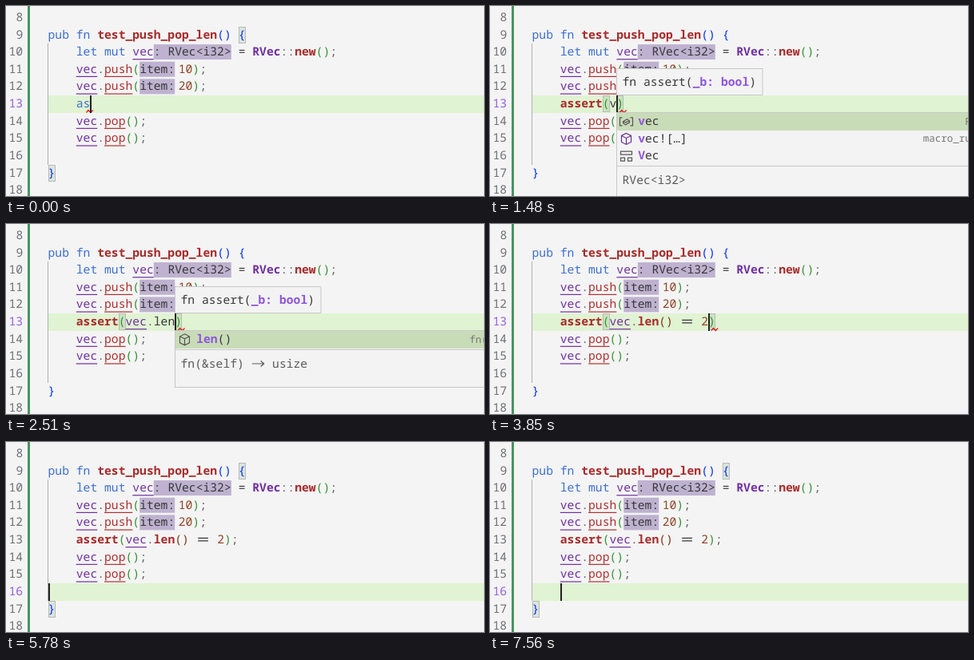
Recreate the animation shown at these times as an HTML page. Size 598 by 238 pixels, loop 8 s.

```html
<!DOCTYPE html>
<html lang="en">
<head>
<meta charset="utf-8">
<title>Typing Rust in an editor</title>
<style>
  html, body { margin: 0; width: 100%; height: 100%; overflow: hidden; background: #f4f4f4; }
  svg { display: block; width: 598px; height: 238px; }
  text {
    font: 14.7px 'Noto Sans Mono', 'DejaVu Sans Mono', monospace;
    white-space: pre;
    text-rendering: geometricPrecision;
  }
  text.bold { font-weight: 700; }
  text.small { font-size: 12.5px; }
</style>
</head>
<body>
<svg id="stage" viewBox="0 0 598 238"></svg>
<script>
const LOOP = 8000, CHAR = 8.82, LINE = 21.65, BASE = 15.1;
const BRACKETS = ['#0431fa', '#319331', '#7b3814'];
const INK = '#383838', RED = '#a82a2a', PURPLE = '#7030a0', MATCH = '#8f56dc';
const PANEL = '#f3f3f3', EDGE = '#c8c8c8';

const colX = col => 52.5 + col * CHAR;
const rowY = row => 112 + (row - 13) * LINE;
const escapeText = s => s.replace(/&/g, '&amp;').replace(/</g, '&lt;');

const rect = (x, y, w, h, fill, extra = '') =>
  `<rect x="${x}" y="${y}" width="${w}" height="${h}" fill="${fill}" ${extra}/>`;
const path = (d, color, width = 1.2, x = 0, y = 0) =>
  `<path d="${d}" transform="translate(${x} ${y})" fill="none" stroke="${color}" stroke-width="${width}"/>`;

function text(x, y, string, color, cls = '') {
  const arrow = string.indexOf('->');
  const shaft = arrow < 0 ? '' : path('M1 0H16M12 -3.5L16 0L12 3.5', color, 1.2, x + arrow * CHAR, y - 5);
  return `<text x="${x}" y="${y}" fill="${color}" class="${cls}">${escapeText(string.replace('->', '  '))}</text>` + shaft;
}

// Syntax rules: pattern, colour, bold, underlined
const RULES = [
  [/^(pub|fn|let|mut|as)\b/, '#3c6fd0'],
  [/^RVec\b/, PURPLE, true],
  [/^(test_push_pop_len|assert|new|len(?=\())(?!\w)/, RED, true],
  [/^vec\b/, PURPLE, false, true],
  [/^(push|pop)\b/, '#b03030', false, true],
  [/^\d+/, '#8f4326'],
  [/^(::|[.;])/, '#666'],
  [/^(\w+|\s+|.)/, INK]
];

// Inlay hints are written between square brackets.
function codeLine(row, source, depth) {
  let x = colX(0), out = '';
  const top = rowY(row), base = top + BASE;
  while (source) {
    const hint = source.match(/^\[(.+?)\]/);
    if (hint) {
      const width = hint[1].length * CHAR;
      out += rect(x, top + 1, width, 19, '#beb2d0') + text(x, base, hint[1], INK);
      x += width + (hint[1] === 'item:' ? CHAR / 2 : 0);
      source = source.slice(hint[0].length);
      continue;
    }
    if (source.startsWith('==')) {
      out += path('M2.5 -6.8H15.2M2.5 -3.2H15.2', INK, 1.2, x, base);
      x += 2 * CHAR;
      source = source.slice(2);
      continue;
    }
    const [pattern, color, bold, underlined] = RULES.find(rule => rule[0].test(source));
    const token = source.match(pattern)[0], width = token.length * CHAR;
    let fill = color;
    if ('({'.includes(token)) fill = BRACKETS[depth++];
    else if (')}'.includes(token)) fill = BRACKETS[--depth];
    out += text(x, base, token, fill, bold ? 'bold' : '');
    if (underlined) out += rect(x, top + 19.1, width, 1.2, color);
    x += width;
    source = source.slice(token.length);
  }
  return out;
}

const ICONS = {
  cube: 'M0 -7L6 -4V4L0 7L-6 4V-4ZM-6 -4L0 -1L6 -4M0 -1V7',
  variable: 'M-5 -5H-8V5H-5M5 -5H8V5H5M-4 0L1 -3L4 -1V1L-1 4L-4 2ZM-4 0L-1 1L4 -1',
  struct: 'M-7 -6H7V-2H-7ZM-7 2H-2V6H-7ZM2 2H7V6H2Z'
};

const macro = name => ['cube', name + '!(…)', 'macro_rules! ' + name];
const intrinsic = name => ['cube', `${name}() (use std::intrinsics::${name})`, ''];
const MENUS = {
  assert: {
    items: [
      macro('assert'), ['cube', 'assert(…)', 'fn(bool)'], macro('assert_eq'), macro('assert_ne'),
      intrinsic('assert_uninit_valid'), intrinsic('assert_inhabited'), intrinsic('assert_zero_valid'),
      macro('debug_assert'), macro('debug_assert_eq'), macro('debug_assert_ne'),
      ['cube', 'assert_matches!(…)', ''], ['cube', 'debug_assert_matches!(…)', '']
    ]
  },
  vec: {
    items: [['variable', 'vec', 'RVec<i32>'], ['cube', 'vec![…]', 'macro_rules! vec'], ['struct', 'Vec', '']],
    doc: 'RVec<i32>'
  },
  methods: {
    items: [['cube', 'len()', 'fn(&self) -> usize'], ['cube', 'pop()', 'fn(&mut self)'], ['cube', 'push(…)', 'fn(&mut self)']],
    doc: 'fn(&self) -> usize'
  },
  len: { items: [['cube', 'len()', 'fn(&self) -> usize']], doc: 'fn(&self) -> usize' }
};

function menuPanel({ name, col, match, above }, row) {
  const { items, doc } = MENUS[name];
  const x = Math.round(colX(col)) + 0.5, width = 513;
  const listHeight = items.length * LINE, height = Math.round(listHeight + (doc ? 49 : 1));
  const top = above ? Math.round(rowY(row)) - height - 0.5 : Math.round(rowY(row + 1)) - 0.5;
  let out = rect(x, top, width, height, PANEL, `stroke="${EDGE}"`);
  out += rect(x + 0.5, top + 0.5, width, 22, '#c9dcb8');
  items.forEach(([icon, label, detail], i) => {
    const y = top + i * LINE, base = y + BASE + 0.3, labelX = x + 26.7;
    const start = match ? label.toLowerCase().indexOf(match) : 0;
    const end = start + match.length;
    out += path(ICONS[icon], i && icon === 'cube' ? '#652d90' : '#555', 1.2, x + 12, y + 11.3);
    out += text(labelX, base, label.slice(0, start), INK);
    out += text(labelX + start * CHAR, base, label.slice(start, end), MATCH, 'bold');
    out += text(labelX + end * CHAR, base, label.slice(end), INK);
    if (detail) out += text(x + 503.3 - detail.length * 7.5, base - 0.4, detail, '#777', 'small');
  });
  if (doc) {
    const y = Math.round(top + listHeight + 1.5);
    out += rect(x, y, width, 1, EDGE) + text(x + 7, y + 23, doc, '#5a5a5a');
  }
  return out;
}

function signaturePanel(col) {
  const x = Math.round(colX(col)) + 0.5, base = 99.8, textX = x + 7;
  return rect(x, 78.5, 182.5, 33, PANEL, `stroke="${EDGE}"`) +
    text(textX, base, 'fn assert(', INK) +
    text(textX + 10 * CHAR, base, '_b: bool', MATCH, 'bold') +
    text(textX + 18 * CHAR, base, ')', INK);
}

const bracketBox = (row, col) => {
  const top = Math.ceil(rowY(row));
  return rect(Math.round(colX(col)) + 0.5, top + 0.5, 8, 20, 'rgba(0,100,0,.1)', 'stroke="#b9b9b9"');
};

const DONE = '    assert(vec.len() == 2);';
const menu = (name, col, match, above) => ({ name, col, match, above });

// Typing on row 13; "|" marks the caret.
const typing = (at, line, extra = {}) => {
  const caret = line.indexOf('|') + 4;
  return { at, row: 13, caret, line: '    ' + line.replace('|', ''), error: true, ...extra };
};
const argument = (at, line, name, match) => {
  const caret = line.indexOf('|') + 4;
  return typing(at, line, { pair: true, signature: caret, menu: name && menu(name, caret, match) });
};
const moved = (at, row, caret, extra = {}) => ({ at, row, caret, line: DONE, last: '', ...extra });

const STEPS = [
  typing(0, 'as|'),
  typing(150, 'ass|'),
  typing(300, 'ass|', { menu: menu('assert', 7, 'ass') }),
  typing(590, 'asse|', { menu: menu('assert', 8, 'asse') }),
  typing(740, 'asser|', { menu: menu('assert', 9, 'asser') }),
  typing(890, 'assert|', { menu: menu('assert', 9, 'assert') }),
  typing(1040, 'assert|', { menu: menu('assert', 10, 'assert') }),
  typing(1190, 'assert(|)', { pair: true }),
  argument(1330, 'assert(|)'),
  argument(1480, 'assert(v|)', 'vec', 'v'),
  argument(1620, 'assert(ve|)', 'vec', 've'),
  argument(1770, 'assert(vec|)', 'vec', 'vec'),
  argument(1920, 'assert(vec.|)'),
  argument(2070, 'assert(vec.|)', 'methods', ''),
  argument(2210, 'assert(vec.l|)', 'len', 'l'),
  argument(2360, 'assert(vec.le|)', 'len', 'le'),
  argument(2510, 'assert(vec.len|)', 'len', 'len'),
  argument(2810, 'assert(vec.len()|)'),
  argument(2960, 'assert(vec.len() |)'),
  typing(3110, 'assert(vec.len() =|)', { pair: true }),
  typing(3250, 'assert(vec.len() ==|)', { pair: true }),
  typing(3400, 'assert(vec.len() == |)', { pair: true }),
  typing(3850, 'assert(vec.len() == 2|)', { pair: true }),
  typing(4000, 'assert(vec.len() == 2)|', { pair: true }),
  typing(4140, 'assert(vec.len() == 2);|'),
  typing(4440, 'assert(vec.len() == 2);|', { error: false }),
  moved(4890, 14, 14),
  moved(5040, 15, 14),
  moved(5480, 15, 14, { hidden: true }),
  moved(5780, 16, 0),
  moved(6220, 16, 1),
  moved(6370, 16, 2),
  moved(6510, 16, 3),
  moved(6810, 16, 5, { last: '   as' }),
  moved(6960, 16, 6, { last: '   ass', menu: menu('assert', 6, 'ass', true) }),
  moved(7260, 16, 5, { last: '   as', menu: menu('assert', 5, 'as', true) }),
  moved(7410, 16, 3),
  moved(7560, 16, 4)
];

function draw(step) {
  const { row, caret, line } = step;
  const top = Math.round(rowY(row)), height = Math.round(rowY(row + 1)) - top;
  let out = rect(0, 0, 598, 238, '#f4f4f4') + rect(52, top, 546, height, '#e0f3d2');
  out += rect(27, 0, 3, 238, '#4a9560');
  out += rect(52, 47, 1, 152, '#b0b0b0');
  for (let n = 8; n <= 18; n++) {
    const label = String(n);
    out += text(21.2 - label.length * CHAR, rowY(n) + BASE, label, n === row ? '#9660d8' : '#6e7073');
  }

  if (step.pair) out += bracketBox(13, 10) + bracketBox(13, line.lastIndexOf(')'));
  else out += bracketBox(9, 27) + bracketBox(17, 0);

  out += codeLine(9, 'pub fn test_push_pop_len() {', 0);
  [
    '    let mut vec[: RVec<i32>] = RVec::new();',
    '    vec.push([item:]10);',
    '    vec.push([item:]20);',
    line,
    '    vec.pop();',
    '    vec.pop();',
    step.last || ''
  ].forEach((source, i) => { out += codeLine(10 + i, source, 1); });
  out += codeLine(17, '}', 1);

  if (step.error) out += path('M-5 2L-2.5 -1L0.5 2L3.5 -1', '#e02020', 1.3, colX(line.length), 131.5);
  if (!step.hidden) out += rect(Math.round(colX(caret)), top, 2, height, '#222');
  if (step.menu) out += menuPanel(step.menu, row);
  if (step.signature) out += signaturePanel(step.signature);
  return out;
}

const stage = document.getElementById('stage');
let shown;
function tick() {
  const time = performance.now() % LOOP;
  const step = STEPS.findLast(s => s.at <= time);
  if (step !== shown) stage.innerHTML = draw(shown = step);
  requestAnimationFrame(tick);
}
tick();
</script>
</body>
</html>
```
